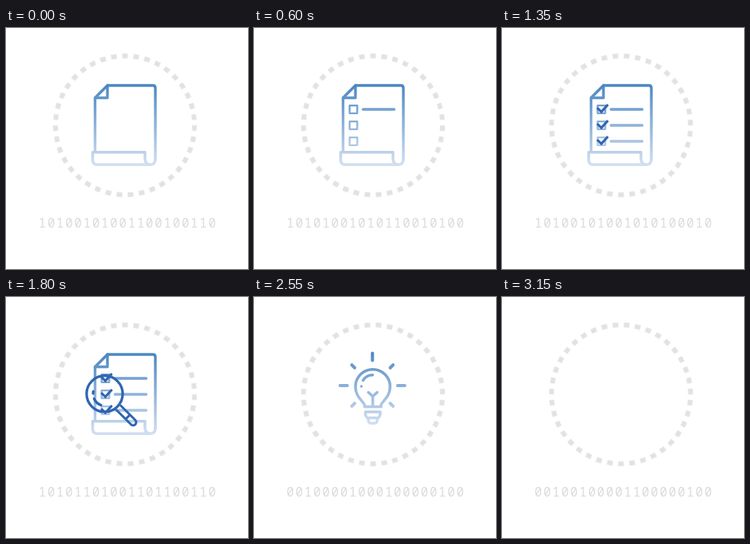
Animation of 303x302 px, one loop 3300 ms. Source, as an HTML page:

```html
<!DOCTYPE html>
<html lang="en">
<head>
<meta charset="utf-8">
<title>Document review</title>
<style>
html, body { margin: 0; width: 100%; height: 100%; overflow: hidden; background: #fff; }
svg { display: block; width: 100%; height: 100%; }
.art { fill: none; stroke-linecap: round; stroke-linejoin: round; }
.ring {
  fill: none; stroke: #e2e2e2; stroke-width: 6; stroke-dasharray: 1 1;
  transform-origin: 149px 122px;
  animation: turn 3300ms steps(22) infinite;
}
/* half a dash pitch per step: 11 of 39 pitches in a loop */
@keyframes turn {
  from { transform: rotate(-92.308deg); }
  to { transform: rotate(9.231deg); }
}
.code {
  font: 15.5px "Noto Sans Mono", "DejaVu Sans Mono", monospace;
  letter-spacing: 1.9px; text-anchor: middle; fill: #dadada;
}
[data-on] { visibility: hidden; }
</style>
</head>
<body>
<svg viewBox="0 0 303 302">
  <defs>
    <linearGradient id="page" gradientUnits="userSpaceOnUse" x1="0" y1="70" x2="0" y2="173">
      <stop offset="0" stop-color="#4a86c1"/>
      <stop offset="1" stop-color="#d3e0f2"/>
    </linearGradient>
    <linearGradient id="glow" gradientUnits="userSpaceOnUse" x1="0" y1="70" x2="0" y2="160">
      <stop offset="0" stop-color="#5089c3"/>
      <stop offset="1" stop-color="#d3e0f2"/>
    </linearGradient>
  </defs>

  <circle class="ring" cx="149" cy="122" r="87" pathLength="78"/>

  <g class="art" stroke="url(#page)" stroke-width="3.4">
    <g data-on="0 15">
      <path d="M111.500 155V87.500L127 72H184Q187 72 187 75.300V164.500"/>
      <path d="M127 72V87.500H111.500"/>
      <path d="M174 155.700H108.500V165.500Q108.500 171.300 114.500 171.300H180.500Q187 171 187 164.500M174 155.700V164.500Q174.500 171 180.500 171.300"/>
    </g>
    <g id="rows"></g>
  </g>

  <g id="lens" class="art" data-on="10 15" stroke="#2f65b1" stroke-width="3.2">
    <circle cx="123.500" cy="121.300" r="22.600"/>
    <path d="M109.300 118.300L109 121M110.300 127.500Q113 133.500 119 135.500"/>
    <path transform="translate(123.500 121.300) rotate(45)" stroke-width="2.900"
      d="M25 -3.800H50.500A3.800 3.800 0 0 1 50.500 3.800H25M41 -3.800V3.800"/>
  </g>

  <g class="art" stroke="url(#glow)" stroke-width="3.5">
    <g data-on="15 21">
      <path d="M139 137.500C139 131 127 127 127 112.400A21.700 21.700 0 0 1 170.400 112.400C170.400 127 158.400 131 158.400 137.500"/>
      <path d="M136.500 104.500Q140.500 97.800 148.500 97.800M134.400 112V112.100"/>
      <path d="M148.700 137V124.500L143.200 119.500M148.700 124.500L154.200 119.500"/>
      <path d="M138.500 137.600H159.300M139.500 144H158M139.500 144Q139 149.500 142 151.500H155.500Q158.500 149.500 158 144M143 152.500Q143 158.300 146.500 158.300H151Q154.500 158.300 154.500 152.500"/>
    </g>
    <path id="rays" data-on="17 21" stroke-width="4"/>
  </g>

  <text class="code" id="code" x="152.700" y="250"></text>
</svg>
<script>
const STEP = 150, STEPS = 22;
// digits shown at key steps; they jitter in between
const keyCodes = {
  0: "10100101001100100110",
  4: "10101001010110010100",
  9: "10100101001010100010",
  12: "10101101001101100110",
  14: "00100101001100100110",
  17: "00100001000100000100",
  21: "00100100001100000100"
};

const $ = id => document.getElementById(id);

function rand(seed) {
  const x = Math.sin(seed * 12.9898) * 43758.5453;
  return x - Math.floor(x);
}

function digits(n) {
  const key = Math.max(...Object.keys(keyCodes).filter(k => k <= n));
  const base = keyCodes[key];
  const age = n - key;
  return [...base].map((d, i) => {
    const isEnd = i === 0 || i === base.length - 1;
    const flip = isEnd ? age % 2 === 1 : age > 0 && rand(n * base.length + i) < .08;
    return flip ? 1 - d : d;
  }).join("");
}

// boxes, then lines, then ticks, one per step
$("rows").innerHTML = [0, 1, 2].map(i => {
  const y = 102 + 20 * i;
  return `<rect data-on="${1 + i} 15" x="119.7" y="${y - 4.8}" width="9.6" height="9.6" stroke-width="2.3"/>
    <path data-on="${4 + i} 15" d="M136.5 ${y}H175.5v.01"/>
    <path data-on="${7 + i} 15" stroke="#2f65b1" stroke-width="3.1" stroke-linecap="butt" stroke-linejoin="miter"
      d="M119.2 ${y - 2}L124.4 ${y + 3}L132.7 ${y - 6}"/>`;
}).join("");

// seven rays, 45 degrees apart, the diagonal ones shorter
$("rays").setAttribute("d", [-3, -2, -1, 0, 1, 2, 3].map(k => {
  const a = k * Math.PI / 4;
  const at = r => `${148.3 + r * Math.sin(a)} ${111 - r * Math.cos(a)}`;
  return `M${at(31.5)}L${at(k % 2 ? 36.5 : 40.5)}`;
}).join(""));

const parts = [...document.querySelectorAll("[data-on]")].map(el => {
  const [from, to] = el.dataset.on.split(" ").map(Number);
  return { el, from, to };
});

let last = -1;
function draw() {
  const n = Math.floor(performance.now() / STEP) % STEPS;
  if (n !== last) {
    last = n;
    for (const { el, from, to } of parts) {
      el.style.visibility = n >= from && n < to ? "visible" : "hidden";
    }
    $("lens").setAttribute("transform", `translate(0 ${31.5 * (n - 12)})`);
    $("code").textContent = digits(n);
  }
  requestAnimationFrame(draw);
}
draw();
</script>
</body>
</html>
```
